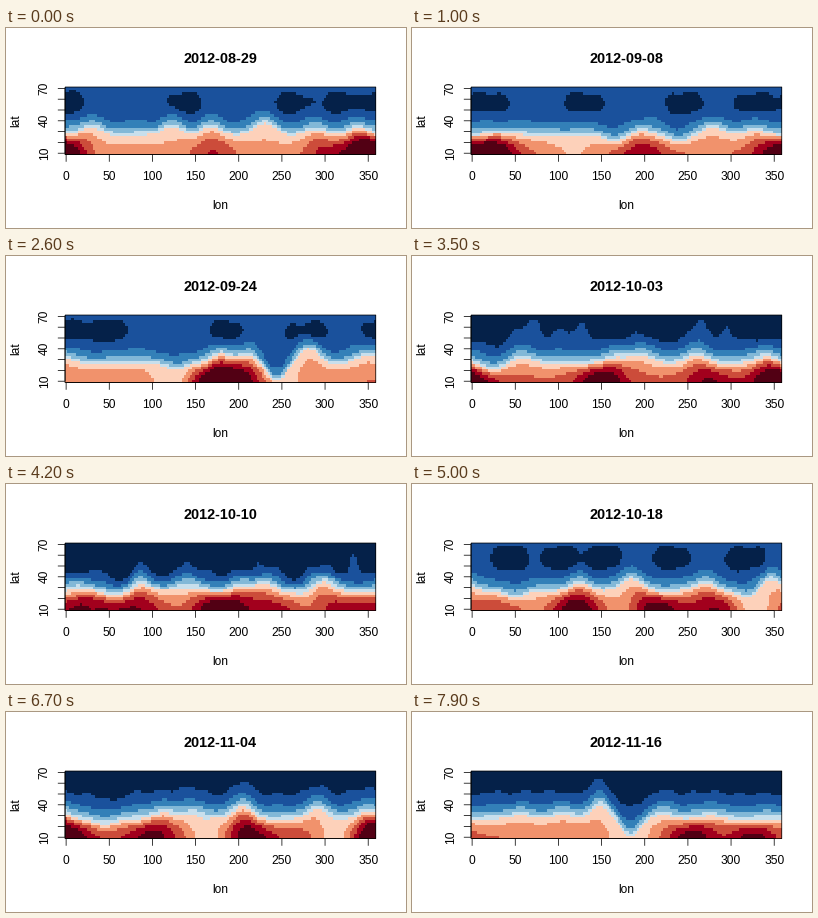
Animation, 400 px wide and 200 px high, one loop 8000 ms. Source, as a matplotlib script:

```python
import numpy as np
import matplotlib.pyplot as plt
from matplotlib.animation import FuncAnimation
from matplotlib.colors import ListedColormap

W, H, DPI = 400, 200, 72
FRAMES, INTERVAL = 80, 100
LINE = 14.4   # margin line height in pixels
DRIFT = 5     # eastward drift of the waves, degrees per day
START = np.datetime64("2012-08-29")

# Plot box and the geographic range it covers
LEFT, RIGHT = 4.1 * LINE, W - 2.1 * LINE
TOP, BOTTOM = 4.1 * LINE, H - 5.1 * LINE
LON = np.arange(0, 360, 2.5)[None, :]
LAT = np.linspace(70, 10, 25)[:, None]

CMAP = ListedColormap([
    "#052149", "#1a519c", "#3380b8", "#82b8d7", "#c8dfec",
    "#fdd1ba", "#f1926c", "#cc4c3a", "#a2001d", "#520014"])

plt.rcParams["font.family"] = "Liberation Sans"


def bumps(lon, centers, width):
    """Sum of bell curves around the globe; centers maps lon to height."""
    total = np.zeros_like(lon, dtype=float)
    for x, height in centers.items():
        d = (lon - x + 180) % 360 - 180
        total += height * np.exp(-(d / width) ** 2)
    return total


class Pattern:
    """Polar and tropical levels, ridges that lift the front,
    hot spots in the south and cold cores in the north."""

    def __init__(self, day, polar, tropic, ridges, hot, cores=()):
        self.day, self.polar, self.tropic = day, polar, tropic
        self.ridges, self.hot = ridges, hot
        self.cores = dict.fromkeys(cores, -1)

    def field(self, day):
        lon = LON - DRIFT * (day - self.day)
        front = np.maximum(27 + bumps(lon, self.ridges, 16), 11)
        south = self.tropic + bumps(lon, self.hot, 28)
        q = (LAT - 8.75) / (front - 8.75)
        warm = 5 + (south - 5) * (1 - q ** 2)
        decay = np.exp(-np.maximum(LAT - front, 0) / (14 - 5 * self.polar))
        cool = self.polar + (5 - self.polar) * decay
        cool = cool + bumps(lon, self.cores, 22) * np.exp(-((LAT - 55) / 10) ** 2)
        return np.clip(np.where(LAT < front, warm, cool), 0, 9.99)


PATTERNS = [
    Pattern(0, 1.25, 6.3,
            {30: 8, 122: 8, 168: 7, 230: 11, 290: 5, 338: 7},
            {0: 2.5, 170: 1.8, 300: 2, 345: 3}, (5, 140, 262, 320)),
    Pattern(10, 1.25, 6.9,
            {30: 3, 165: -6, 195: 4, 240: -6, 280: 7, 325: 4},
            {25: 3.5, 118: -1, 198: 2, 350: 2.5}, (18, 130, 252, 325)),
    Pattern(26, 1.25, 7,
            {128: -6, 180: 8, 212: 7, 244: -17, 280: 13, 350: 7},
            {125: -2, 165: 3, 200: 3, 250: -1.5}, (5, 47, 185, 280)),
    Pattern(35, 0.8, 7.2,
            {25: -6, 60: 4, 165: 5, 195: 8, 262: 7, 342: 6},
            {5: 1.5, 150: 3.2, 275: 2, 345: 2.4}, (15, 165, 222, 330)),
    Pattern(50, 1.15, 8,
            {50: -6, 125: 7, 185: 11, 270: 7, 322: -7, 345: 12},
            {75: -1.5, 120: 2.2, 172: -2, 210: 2.2, 290: 1.5, 325: -3},
            (45, 105, 150, 230, 316)),
    Pattern(67, 0, 7.6,
            {45: -5, 112: 6, 148: 6, 205: 11, 293: 9, 350: 7},
            {0: 2, 100: 2, 165: -2.4, 210: 2.4, 318: -2.6, 350: 2}),
    Pattern(79, 0.1, 7,
            {55: 4, 105: 4, 150: 13, 183: -16, 220: 5, 278: 3},
            {182: -2, 255: 2.8, 325: 2.5}),
]

rng = np.random.default_rng(12)
WAVES = [(m, rng.uniform(0, 2 * np.pi), rng.uniform(4, 7), rng.uniform(25, 60))
         for m in (4, 5, 6, 7, 9, 13)]


def ripple(day):
    """Small travelling waves at several latitudes."""
    return sum(np.sin(np.radians(m * (LON - speed * day)) + phase)
               * np.exp(-((LAT - lat) / 12) ** 2)
               for m, phase, speed, lat in WAVES)


def field(day):
    k = max(j for j, p in enumerate(PATTERNS[:-1]) if p.day <= day)
    a, b = PATTERNS[k], PATTERNS[k + 1]
    u = (day - a.day) / (b.day - a.day)
    s = u * u * (3 - 2 * u)
    mix = 4 * u * (1 - u)
    z = (1 - s) * a.field(day) + s * b.field(day)
    z = 5 + (z - 5) * (1 + .15 * mix) + (.1 + .25 * mix) * ripple(day)
    return np.clip(z, 0, 9.99)


def px(lon):
    return LEFT + (lon + 1.25) / 360 * (RIGHT - LEFT)


def py(lat):
    return BOTTOM - (lat - 8.75) / 62.5 * (BOTTOM - TOP)


fig = plt.figure(figsize=(W / DPI, H / DPI), dpi=DPI, facecolor="white")
ax = fig.add_axes([0, 0, 1, 1])
ax.axis("off")


def line(xs, ys):
    ax.plot(xs, ys, color="black", lw=.75, snap=False, solid_capstyle="butt")


def label(x, y, s, size=12, **kw):
    return ax.text(x, y, s, fontsize=size, ha="center", va="baseline",
                   rotation_mode="anchor", **kw)


image = ax.imshow(field(0), cmap=CMAP, vmin=0, vmax=10, aspect="auto",
                  interpolation="nearest", extent=(LEFT, RIGHT, BOTTOM, TOP))
line([LEFT, RIGHT, RIGHT, LEFT, LEFT], [TOP, TOP, BOTTOM, BOTTOM, TOP])

line([px(0), px(350)], [BOTTOM, BOTTOM])
for lon in range(0, 351, 50):
    line([px(lon)] * 2, [BOTTOM, BOTTOM + LINE / 2])
    label(px(lon), BOTTOM + 1.8 * LINE, str(lon))

line([LEFT, LEFT], [py(10), py(70)])
for lat in range(10, 71, 10):
    line([LEFT - LINE / 2, LEFT], [py(lat)] * 2)
for lat in (10, 40, 70):
    label(LEFT - 1.2 * LINE, py(lat), str(lat), rotation=90)

mid_x, mid_y = (LEFT + RIGHT) / 2, (TOP + BOTTOM) / 2
label(mid_x, BOTTOM + 3.8 * LINE, "lon")
label(LEFT - 3.2 * LINE, mid_y, "lat", rotation=90)
title = label(mid_x, 34.7, "", 14.4, weight="bold")

ax.set_xlim(0, W)
ax.set_ylim(H, 0)


def update(i):
    image.set_data(field(i))
    title.set_text(str(START + i))
    return image, title


anim = FuncAnimation(fig, update, frames=FRAMES, interval=INTERVAL,
                     repeat=True, repeat_delay=0)
plt.show()
```
